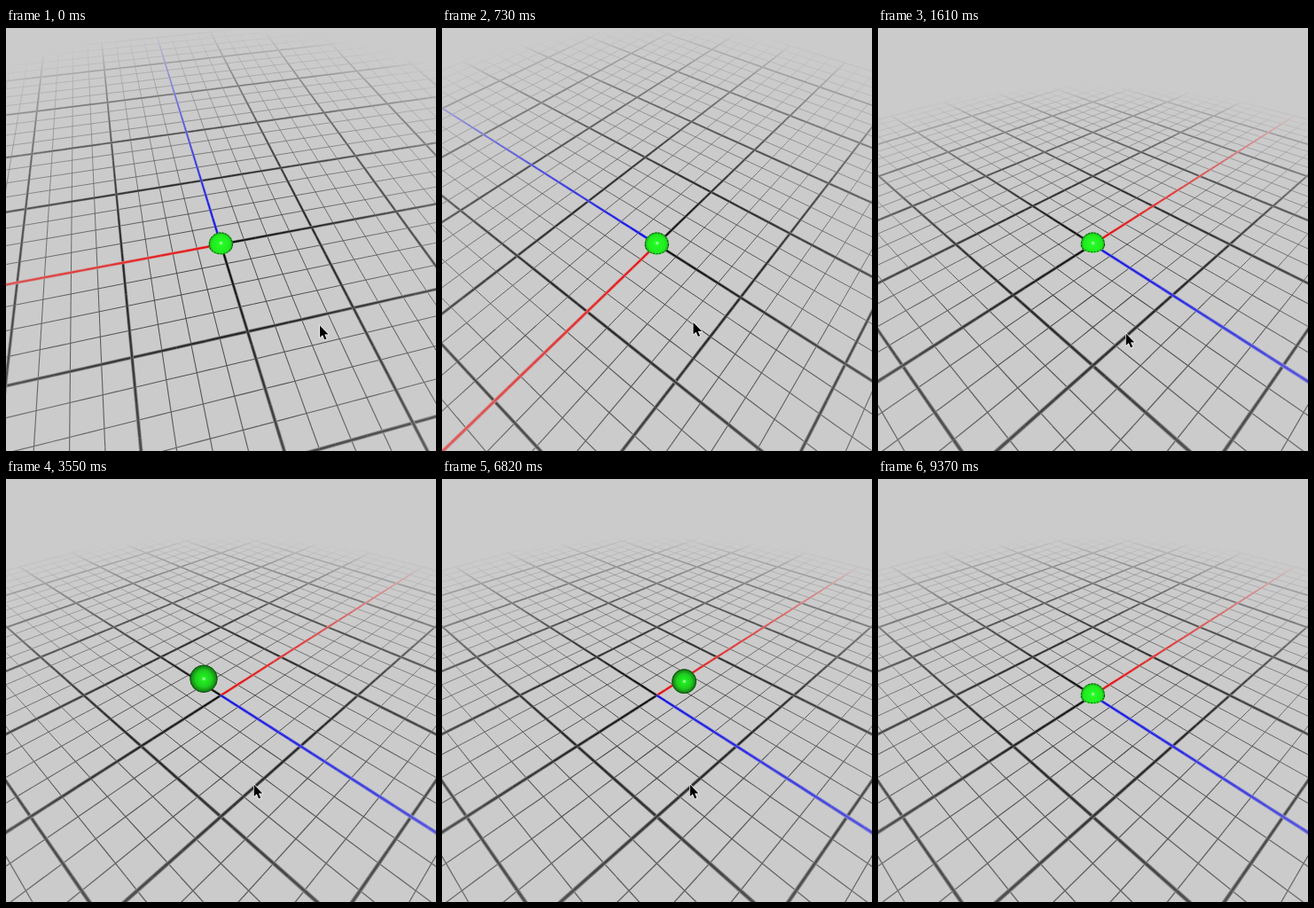
An HTML page with a canvas that plays this animation: 485 by 477 pixels, repeating every 9940 ms.

```html
<!DOCTYPE html>
<html lang="en">
<head>
<meta charset="utf-8">
<title>Orbiting grid</title>
<style>
  html, body { margin: 0; width: 100%; height: 100%; overflow: hidden; background: #cbcbcb; }
  canvas { display: block; width: 485px; height: 477px; }
</style>
</head>
<body>
<canvas id="stage" width="485" height="477"></canvas>
<script>
const ctx = document.getElementById('stage').getContext('2d');
const LOOP = 9940;
const BG = 203;
const CX = 242.3, CY = 244;    // projected world origin
const FOCAL = 425, DIST = 3.89;
const REACH = 5.2;             // grid fades out at this radius
const CELLS = 4;               // thin cells per bold cell
const PIECES = 2;              // strokes per thin cell, for the fade
const RADIUS = 0.124;

// Bursts of stepped motion: first step, last step, number of steps
const BURSTS = [
  [150, 1040, 7], [1610, 2560, 8], [2710, 3700, 8], [3830, 4780, 8],
  [5650, 6670, 8], [6820, 7770, 8], [7900, 8930, 8], [9080, 9370, 3]
];

// time, azimuth, pitch (degrees)
const VIEW = [
  [0, 13.5, 51.4], [743, 50.8, 51.5], [890, 130, 45],
  [1040, 218, 39.8], [1609, 218, 39.8], [1610, 225, 39.6]
];

// time, x, y of the pointer tip
const POINTER = [
  [0, 354, 335.5], [743, 283.7, 332], [1040, 58, 318], [1609, 58, 318],
  [1610, 279.7, 344.5], [8940, 279.7, 344.5], [9080, 335, 392], [9225, 406, 449.5]
];

function snap(t) {
  let out = 0;
  for (const [from, to, n] of BURSTS) {
    if (t < from) break;
    const step = (to - from) / (n - 1);
    const i = Math.min(n - 1, Math.floor((t - from + 15) / step));
    out = from + i * step;
  }
  return out;
}

function track(keys, t) {
  const last = keys.length - 1;
  if (t >= keys[last][0]) return keys[last].slice(1);
  let i = 0;
  while (keys[i + 1][0] <= t) i++;
  const a = keys[i], b = keys[i + 1];
  const u = (t - a[0]) / (b[0] - a[0]);
  return a.slice(1).map((v, k) => v + (b[k + 1] - v) * u);
}

function makeCamera(azimuth, pitch) {
  const rad = Math.PI / 180;
  const sa = Math.sin(azimuth * rad), ca = Math.cos(azimuth * rad);
  const sp = Math.sin(pitch * rad), cp = Math.cos(pitch * rad);
  // side: to the right, near: towards the viewer, h: height
  const place = (side, near, h) => {
    const depth = DIST - near * cp - h * sp;
    const k = FOCAL / depth;
    return { x: CX + side * k, y: CY + (near * sp - h * cp) * k, k, depth };
  };
  const ground = (x, z) => place(-x * ca - z * sa, x * sa - z * ca, 0);
  return { place, ground, sp, cp };
}

function gridLine(cam, at, along, from, to, width, rgb, strength) {
  const step = 1 / CELLS / PIECES;
  const point = v => along === 'x' ? cam.ground(v, at) : cam.ground(at, v);
  for (let v = from; v < to - 1e-6; v += step) {
    const r = Math.hypot(at, v + step / 2);
    if (r >= REACH) continue;
    const a = point(v), b = point(v + step);
    if (a.depth < 0.5 || b.depth < 0.5) continue;
    const alpha = strength * (1 - Math.pow(r / REACH, 1.1));
    const mix = rgb.map(c => Math.round(BG + (c - BG) * alpha));
    ctx.strokeStyle = `rgb(${mix})`;
    ctx.lineWidth = Math.max(0.6, width * (a.k + b.k) / 2);
    ctx.beginPath();
    ctx.moveTo(a.x, a.y);
    ctx.lineTo(b.x, b.y);
    ctx.stroke();
  }
}

// A wide pale stroke under a narrow one gives bold lines a soft edge
function boldLine(cam, at, along, from, to, rgb) {
  gridLine(cam, at, along, from, to, 0.029, rgb, 0.42);
  gridLine(cam, at, along, from, to, 0.017, rgb, 1);
}

function drawGrid(cam) {
  const max = Math.floor(REACH * CELLS);
  const end = max / CELLS;
  const black = [8, 8, 8];
  for (const bold of [false, true]) {
    for (let i = -max; i <= max; i++) {
      if (i === 0 || (i % CELLS === 0) !== bold) continue;
      for (const dir of ['x', 'z']) {
        if (bold) boldLine(cam, i / CELLS, dir, -end, end, black);
        else gridLine(cam, i / CELLS, dir, -end, end, 0.0078, black, 0.8);
      }
    }
  }
  boldLine(cam, 0, 'x', -end, 0, black);
  boldLine(cam, 0, 'z', -end, 0, black);
  boldLine(cam, 0, 'x', 0, end, [232, 12, 12]);
  boldLine(cam, 0, 'z', 0, end, [12, 12, 232]);
}

// Steady drift away from the origin, then a jump back
function ballOffset(t) {
  if (t >= 1610 && t < 4770) {
    const d = (t - 1610) * 0.000508;
    return [-0.156 * d, 0.289 * d, 0.435 * d];
  }
  if (t >= 5650 && t < 9070) {
    const d = (t - 5650) / 1170 + 0.01;
    return [0.274 * d, -0.036 * d, 0.153 * d];
  }
  return [0, 0, 0];
}

function drawBall(cam, t) {
  const [side, near, h] = ballOffset(t);
  const p = cam.place(side, near, h);
  const r = RADIUS * p.k;
  const resting = h === 0;
  ctx.save();
  if (h < RADIUS) {
    // the ground hides whatever lies below it
    const cut = Math.sqrt(RADIUS * RADIUS - h * h) * p.k;
    const y = p.y + h * cam.cp * p.k;
    ctx.beginPath();
    ctx.rect(p.x - r - 2, p.y - r - 2, 2 * r + 4, y - p.y + r + 2);
    ctx.ellipse(p.x, y, cut + 0.5, cut * cam.sp + 0.8, 0, 0, Math.PI);
    ctx.clip();
  }
  const cy = resting ? p.y - 1.5 : p.y;
  const shade = ctx.createRadialGradient(p.x, cy, 0, p.x, p.y, r);
  const stops = resting
    ? [[0, '#48ff48'], [0.25, '#22fa22'], [0.75, '#20ea20'], [1, '#18a418']]
    : [[0, '#48ff48'], [0.2, '#20ec20'], [0.6, '#1fce1f'], [1, '#127212']];
  for (const [at, color] of stops) shade.addColorStop(at, color);
  ctx.fillStyle = shade;
  ctx.beginPath();
  ctx.arc(p.x, p.y, r, 0, 2 * Math.PI);
  ctx.fill();
  ctx.strokeStyle = '#145014';
  ctx.lineWidth = 1;
  if (resting) ctx.setLineDash([2, 1.5]);
  ctx.beginPath();
  ctx.arc(p.x, p.y, r - 0.4, 0, 2 * Math.PI);
  ctx.stroke();
  if (resting) {
    ctx.beginPath();
    ctx.ellipse(p.x, p.y, r - 0.3, r * cam.sp, 0, 0, Math.PI);
    ctx.stroke();
  }
  ctx.fillStyle = '#a8ffa8';
  ctx.beginPath();
  ctx.arc(p.x + 0.3, cy, 1.5, 0, 2 * Math.PI);
  ctx.fill();
  ctx.restore();
}

const ARROW = new Path2D('M0 0V13.6L3.1 10.8L5.4 16L7.6 15L5.3 10H9.6Z');

function drawPointer(t) {
  if (t >= 9360) return;
  const [x, y] = track(POINTER, t);
  ctx.save();
  ctx.translate(x, y);
  ctx.lineJoin = 'round';
  ctx.lineWidth = 1.4;
  ctx.strokeStyle = '#fff';
  ctx.stroke(ARROW);
  ctx.fillStyle = '#000';
  ctx.fill(ARROW);
  ctx.restore();
}

let shown = -1;
function render(now) {
  const t = snap(now % LOOP);
  if (t !== shown) {
    shown = t;
    ctx.fillStyle = `rgb(${BG},${BG},${BG})`;
    ctx.fillRect(0, 0, 485, 477);
    const cam = makeCamera(...track(VIEW, t));
    drawGrid(cam);
    drawBall(cam, t);
    drawPointer(t);
  }
}

const start = performance.now();
function tick() {
  render(performance.now() - start);
  requestAnimationFrame(tick);
}
tick();
</script>
</body>
</html>
```
